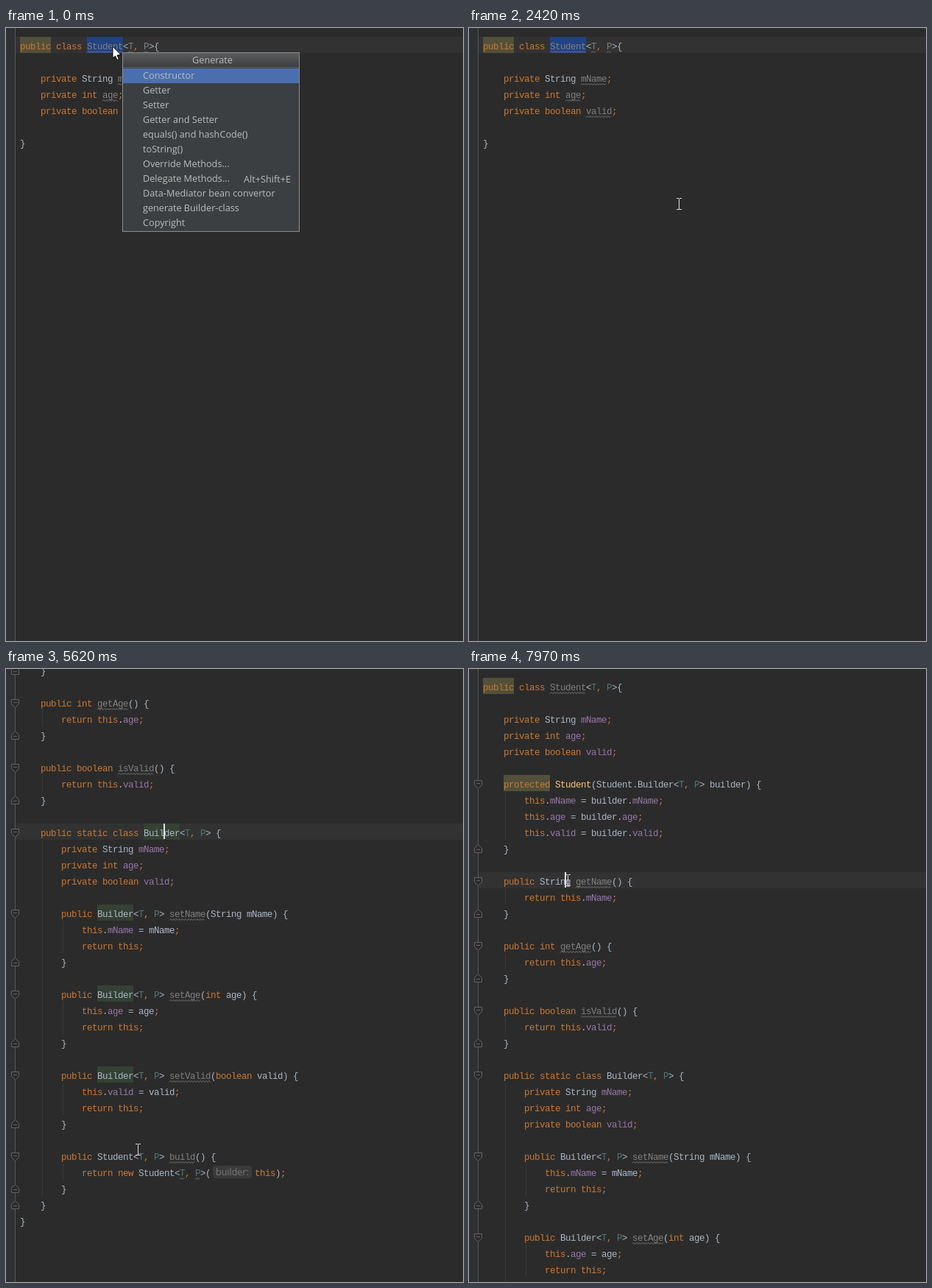
An HTML page with a canvas that plays this animation: 621x833 px, repeating every 8 s.

```html
<!DOCTYPE html>
<html lang="en">
<head>
<meta charset="utf-8">
<title>Generate Builder class</title>
<style>
html, body { margin: 0; width: 100%; height: 100%; overflow: hidden; background: #2b2b2b; }
canvas { display: block; }
</style>
</head>
<body>
<canvas id="stage" width="621" height="833"></canvas>
<script>
const ctx = document.getElementById('stage').getContext('2d');
const LOOP = 8000, ROW = 22, CHAR = 7, LEFT = 19, TOP = 12;
const CODE_FONT = '12.5px "Liberation Mono", monospace';
const UI_FONT = '12.7px "Open Sans", sans-serif';

// Moments of the story, in ms
const MENU_CLOSES = 2420, GENERATED = 2510, ANALYSED = 2870;
const CLICK_BUILDER = 5170, CLICK_BUILD = 5990, CLICK_GETTER = 7970;

const code = `public class Student<T, P>{

    private String mName;
    private int age;
    private boolean valid;

    protected Student(Student.Builder<T, P> builder) {
        this.mName = builder.mName;
        this.age = builder.age;
        this.valid = builder.valid;
    }

    public String getName() {
        return this.mName;
    }

    public int getAge() {
        return this.age;
    }

    public boolean isValid() {
        return this.valid;
    }

    public static class Builder<T, P> {
        private String mName;
        private int age;
        private boolean valid;

        public Builder<T, P> setName(String mName) {
            this.mName = mName;
            return this;
        }

        public Builder<T, P> setAge(int age) {
            this.age = age;
            return this;
        }

        public Builder<T, P> setValid(boolean valid) {
            this.valid = valid;
            return this;
        }

        public Student<T, P> build() {
            return new Student<T, P>(this);
        }
    }
}`.split('\n');
const stub = [...code.slice(0, 6), '}'];

const menu = ['Constructor', 'Getter', 'Setter', 'Getter and Setter', 'equals() and hashCode()',
  'toString()', 'Override Methods...', 'Delegate Methods...', 'Data-Mediator bean convertor',
  'generate Builder-class', 'Copyright'];

// [start, steps, x, y]: the pointer travels in 90 ms steps
const moves = [[280, 6, 293, 262], [910, 3, 285, 239], [2870, 4, 277, 233], [4630, 5, 219, 217],
  [5260, 5, 179, 653], [5710, 2, 258, 663], [6350, 3, 356, 533], [6900, 3, 283, 499], [7280, 7, 134, 287]];
// [time, lines scrolled]
const scrolls = [[0, 0], [3790, 9], [3970, 12], [4070, 15], [6620, 12], [6720, 9], [6900, 6], [7000, 3], [7100, 0]];

const TOKEN = new RegExp([
  '(?<keyword>\\b(?:public|private|protected|static|class|return|new|this|int|boolean)\\b|[;,])',
  '(?<field>(?<=this\\.|builder\\.|private \\w+ )\\w+)',
  '(?<unused>\\b(?:get|set|is)[A-Z]\\w*|\\bbuild(?=\\()|(?<=^public class )\\w+)',
  '(?<param>\\b[TP]\\b)',
  '(?<maker>(?<=protected )\\w+)',
  '(?<plain>\\w+|[^\\s\\w])'
].join('|'), 'g');
const colors = { keyword: '#cc7832', field: '#9876aa', unused: '#808080', param: '#507874', maker: '#ffc66d', plain: '#a9b7c6' };

const colX = col => LEFT + col * CHAR;
const rowY = row => TOP + row * ROW;

function rect(color, x, y, w, h) {
  ctx.fillStyle = color;
  ctx.fillRect(x, y, w, h);
}

function text(str, x, y, color) {
  ctx.fillStyle = color;
  ctx.fillText(str, x, y);
}

function poly(points, stroke, fill, closed = true) {
  ctx.beginPath();
  points.forEach(([x, y]) => ctx.lineTo(x, y));
  if (closed) ctx.closePath();
  if (fill) { ctx.fillStyle = fill; ctx.fill(); }
  ctx.strokeStyle = stroke;
  ctx.lineWidth = 1;
  ctx.stroke();
}

function squiggle(x, y, width) {
  const points = [];
  for (let i = 0; i <= width; i += 2) points.push([x + i, y + (i % 4 ? 0 : 2)]);
  poly(points, '#77787a', null, false);
}

function mark(color, row, col, length) {
  rect(color, colX(col), rowY(row), length * CHAR, ROW);
}

function markWord(color, word, rows) {
  for (const row of rows) mark(color, row, code[row].lastIndexOf(word), word.length);
}

function drawMarks(t) {
  const green = '#344134', olive = '#52503a';
  const caretRow = t >= CLICK_GETTER ? 12 : t >= CLICK_BUILD ? 44 : t >= CLICK_BUILDER ? 24 : 0;
  rect('#323232', 13, rowY(caretRow), 608, ROW);
  mark(olive, 0, 0, 6);
  if (t >= ANALYSED) mark(olive, 6, 4, 9);
  if (t < CLICK_BUILDER) {
    mark('#214283', 0, 13, 7);
    if (t >= ANALYSED) markWord(green, 'Student', [6, 44, 45]);
  } else if (t < CLICK_BUILD) {
    markWord(green, 'Builder', [6, 24, 29, 34, 39]);
  } else if (t < CLICK_GETTER) {
    markWord(green, 'build', [44]);
    markWord('#3b514d', '()', [44]);
  }
}

function drawCaret(t) {
  if (t < CLICK_BUILDER) return;
  const [x, row] = t >= CLICK_GETTER ? [130, 12] : t >= CLICK_BUILD ? [256, 44] : [214, 24];
  rect('#e0e0e0', x, rowY(row), 2, ROW - 1);
}

function drawLine(line, row, t) {
  const analysed = t >= ANALYSED, y = rowY(row);
  for (const match of line.matchAll(TOKEN)) {
    const word = match[0];
    let kind = Object.keys(colors).find(k => match.groups[k] !== undefined);
    let x = colX(match.index), wavy = kind === 'unused' && (analysed || row === 0);
    if (!analysed && row < 6 && (kind === 'field' || kind === 'param')) {
      kind = 'unused';
      wavy = true;
    }
    if (row === 45) {
      if (match.index > 36) x += 60;
      if (kind === 'param' && t >= CLICK_BUILDER) wavy = true;
    }
    const matched = row === 44 && /[()]/.test(word) && t >= CLICK_BUILD && t < CLICK_GETTER;
    ctx.font = (matched ? 'bold ' : '') + CODE_FONT;
    text(word, x, y + 17, matched ? '#ffef28' : colors[kind]);
    if (wavy) squiggle(x, y + 19.5, word.length * CHAR);
  }
}

function drawHint() {
  const y = rowY(45);
  ctx.fillStyle = '#3b3b3b';
  ctx.beginPath();
  ctx.roundRect(281, y + 3, 53, 17, 4);
  ctx.fill();
  ctx.font = '12.5px "Open Sans", sans-serif';
  ctx.letterSpacing = '0px';
  text('builder:', 285, y + 16, '#787878');
}

function drawFold(row, dir) {
  const y = rowY(row) + 12.5;
  poly([[7.5, y - 5 * dir], [17.5, y - 5 * dir], [17.5, y + dir], [12.5, y + 6 * dir], [7.5, y + dir]], '#606366', '#2b2b2b');
  rect('#606366', 10, y - dir - .5, 5, 1);
}

function drawFolds(lines) {
  lines.forEach((line, row) => {
    const indent = line.search(/\S/);
    if (indent < 4) return;
    if (line.endsWith('{')) {
      const end = lines.findIndex((l, i) => i > row && l.search(/\S/) === indent && l.endsWith('}'));
      rect('#393939', colX(indent) + 2, rowY(row + 1), 1, (end - row - 1) * ROW);
      drawFold(row, 1);
    }
    if (line.endsWith('}')) drawFold(row, -1);
  });
}

function drawEditor(t) {
  const lines = t < GENERATED ? stub : code;
  const scroll = scrolls.findLast(s => s[0] <= t)[1] * ROW;
  rect('#2b2b2b', 0, 0, 621, 833);
  rect('#2f3031', 0, 0, 12, 833);
  ctx.save();
  ctx.translate(0, -scroll);
  drawMarks(t);
  rect('#555759', 12, scroll, 1, 833);
  if (t >= ANALYSED) drawFolds(lines);
  ctx.letterSpacing = '-0.5px';
  lines.forEach((line, row) => drawLine(line, row, t));
  if (lines === code) drawHint();
  drawCaret(t);
  ctx.restore();
}

function drawMenu(mouseY) {
  rect('#8b8d8f', 158, 33, 241, 244);
  rect('#3c3f41', 159, 34, 239, 242);
  const title = ctx.createLinearGradient(0, 34, 0, 54);
  title.addColorStop(0, '#5a5c5e');
  title.addColorStop(1, '#3a3c3e');
  rect(title, 159, 34, 239, 20);
  rect('#606264', 159, 53, 239, 1);
  const active = Math.max(0, Math.floor((mouseY - 55) / 20));
  rect('#4b6eaf', 159, 55 + active * 20, 239, 20);
  ctx.font = UI_FONT;
  ctx.letterSpacing = '0px';
  ctx.textAlign = 'center';
  text('Generate', 280.5, 48, '#bbbbbb');
  ctx.textAlign = 'left';
  menu.forEach((item, i) => text(item, 186, 69 + i * 20, '#bbbbbb'));
  text('Alt+Shift+E', 323, 210, '#bbbbbb');
}

function mouseAt(t) {
  let x = 145, y = 25;
  for (const [start, steps, toX, toY] of moves) {
    if (t < start) break;
    const k = Math.min(1, (Math.floor((t - start) / 90) + 1) / steps);
    x += (toX - x) * k;
    y += (toY - y) * k;
  }
  return [Math.round(x), Math.round(y)];
}

function drawArrow() {
  poly([[0, 0], [0, 16], [3.5, 13], [6, 18.5], [8.5, 17.5], [6, 12], [11, 11.5]], '#000', '#fff');
}

function drawHand() {
  poly([[-1.5, 0], [1, 0], [1.5, 6], [4, 6], [5, 7], [7, 7], [8, 8], [10, 9], [10, 14], [8, 18],
    [8, 21], [-1, 21], [-2, 18], [-6, 12], [-5, 10], [-1.5, 13]], '#000', '#fff');
  for (const x of [1, 4, 7]) rect('#000', x, 7, 1, 4);
}

function drawBeam() {
  rect('#dedede', 0, -7, 1, 15);
  for (const y of [-8, 7]) {
    rect('#dedede', -3, y, 3, 1);
    rect('#dedede', 1, y, 3, 1);
  }
}

function draw(t) {
  const [x, y] = mouseAt(t), open = t < MENU_CLOSES;
  drawEditor(t);
  if (open) drawMenu(y);
  ctx.save();
  ctx.translate(x, y);
  if (!open) drawBeam();
  else if (y < 55) drawArrow();
  else drawHand();
  ctx.restore();
}

function tick() {
  draw(performance.now() % LOOP);
  requestAnimationFrame(tick);
}
tick();
</script>
</body>
</html>
```
